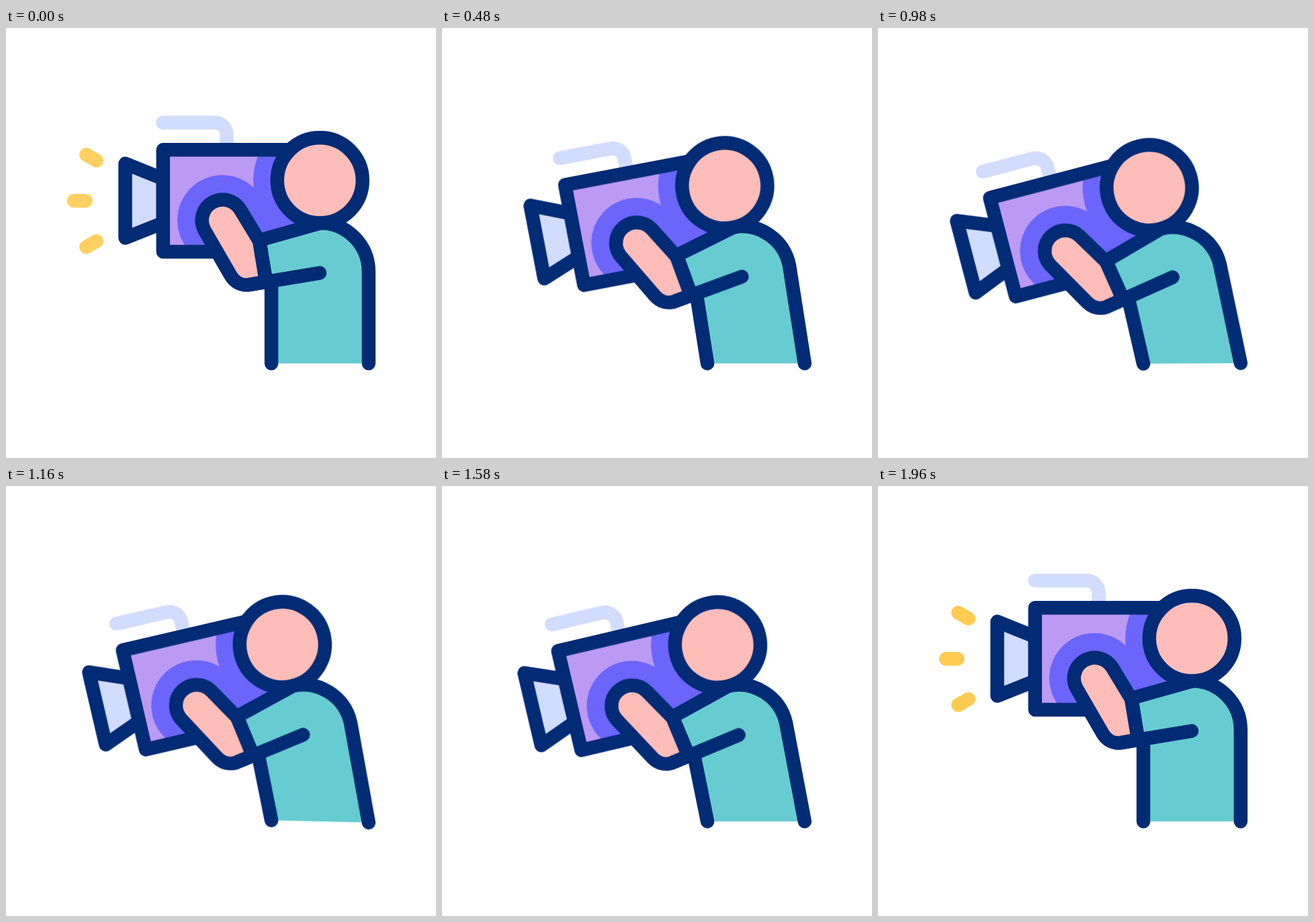
Recreate the animation shown at these times as an HTML page without scripts. Size 640x640 px, loop 2.4 s.

```html
<!DOCTYPE html>
<html lang="en">
<head>
<meta charset="utf-8">
<title>Camera operator</title>
<style>
  html, body { margin: 0; width: 100%; height: 100%; overflow: hidden; background: #fff; }
  svg { display: block; width: 100%; height: 100%; }

  .line { stroke: #022b75; stroke-width: 20.5; stroke-linecap: round; stroke-linejoin: round; fill: none; }
  .pale { fill: #d2dcfe; }
  .handle { fill: none; stroke: #d2dcfe; stroke-width: 20.5; stroke-linecap: round; }
  .lilac { fill: #bc9af3; }
  .violet { fill: #6b65fb; }
  .skin { fill: #ffbdb9; }
  .shirt { fill: #67ccd1; }

  .rays, .sway, .upper, .body {
    animation: 2400ms cubic-bezier(.333, 0, .667, 1) infinite;
  }
  .rays {
    stroke: #ffcb50; stroke-width: 20.5; stroke-linecap: round;
    animation-name: rays; animation-timing-function: linear;
  }
  .sway { transform-origin: 467.4px 499.4px; animation-name: sway; }
  .upper { transform-origin: 467.2px 226.8px; animation-name: tilt; }
  .body { animation-name: lean; }

  @keyframes rays {
    0%, 81.667%, 100% { opacity: 1; }
    7%, 74.5% { opacity: 0; }
  }

  /* the whole figure rocks on its feet while tilted */
  @keyframes sway {
    0%, 26.458% { transform: rotate(0deg); }
    34.583% { transform: rotate(-2.15deg); }
    47.083% { transform: rotate(1.5deg); }
    55.833% { transform: rotate(-1.5deg); }
    62.5%, 100% { transform: rotate(0deg); }
  }

  @keyframes tilt {
    0%, 6.875%, 81.667%, 100% { transform: translate(0px, 0px) rotate(0deg); }
    26.458%, 62.5% { transform: translate(-62px, 10.5px) rotate(-14.4deg); }
  }

  /* shoulders follow the tilt, feet stay */
  @keyframes lean {
    0%, 6.875%, 81.667%, 100% {
      d: path("M395 499.3 L395 385 L387 377 L377 316 L464 291.5 L467 290 C507.3 290 539.8 322.7 539.8 363 L539.8 499.3");
    }
    26.458%, 62.5% {
      d: path("M395 499.3 L374.6 408.5 L364.9 402.7 L340 346.1 L418.2 300.8 L420.7 298.6 C459.8 288.5 499.4 312.1 509.4 351.1 L539.8 499.3");
    }
  }
</style>
</head>
<body>
<svg viewBox="0 0 640 640">
  <defs>
    <clipPath id="case">
      <path d="M234 181.3H467V290L377 318L320 333H234Z"/>
    </clipPath>
  </defs>

  <g class="rays">
    <path d="M119.3 188.6L134.7 197.4"/>
    <path d="M101 257.3H118.5"/>
    <path d="M134.7 317.2L119.3 326"/>
  </g>

  <g class="sway">
    <g class="upper">
      <path class="handle" d="M233.5 140.8H310.4A18 18 0 0 1 328.4 158.8V181"/>
      <path class="line pale" d="M234 224.4L177.5 201.7V312.6L234 290Z"/>
      <g clip-path="url(#case)">
        <path class="lilac" d="M234 181H467V333H234Z"/>
        <g class="violet">
          <circle cx="322" cy="286" r="67"/>
          <circle cx="467" cy="227" r="99"/>
          <path d="M374 246H440V333H374Z"/>
        </g>
      </g>
      <path class="line" d="M320 333H233.8V181.3H440"/>
    </g>

    <path class="line shirt body" d="M395 499.3 L395 385 L387 377 L377 316 L464 291.5 L467 290 C507.3 290 539.8 322.7 539.8 363 L539.8 499.3"/>

    <g class="upper">
      <path class="line skin" d="M377 317L348.6 270.1A30.75 30.75 0 0 0 295.4 300.9L334.4 368.4C340 378 350 383.8 361.5 382.2L387 377.8Z"/>
      <path class="line" d="M361.5 382.2L467 364.6"/>
      <circle class="line skin" cx="467.2" cy="226.8" r="63.5"/>
    </g>
  </g>
</svg>
</body>
</html>
```
